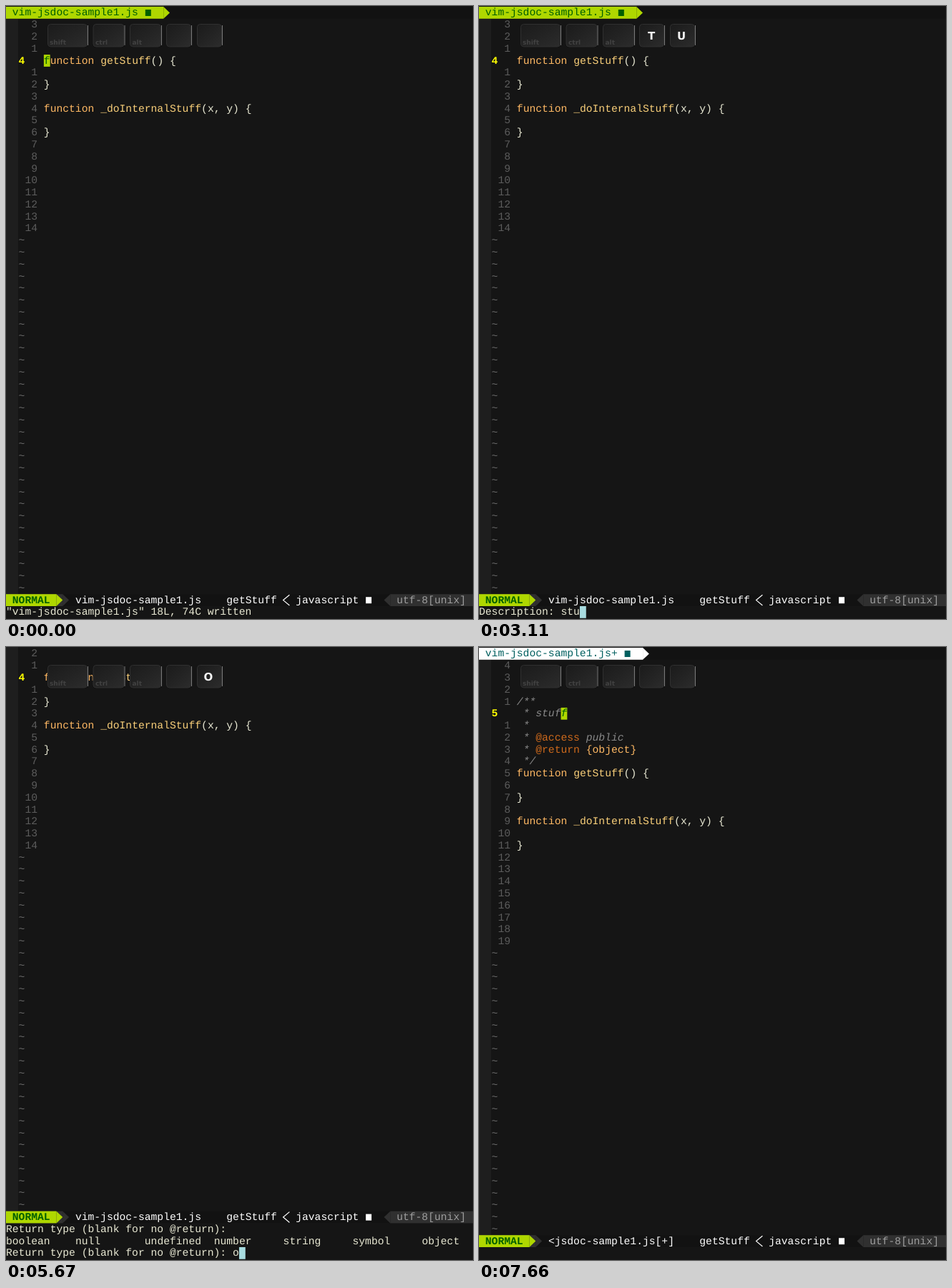
Animation of 653 by 858 pixels, one loop 8000 ms. Source, as an HTML page:

```html
<!DOCTYPE html>
<html lang="en">
<head>
<meta charset="utf-8">
<title>Editor session</title>
<style>
  html, body { margin: 0; width: 100%; height: 100%; overflow: hidden; background: #151515; }
  svg { display: block; }
  text { white-space: pre; text-rendering: geometricPrecision; }
  .mono { font-family: "Liberation Mono", monospace; font-size: 14.68px; }
  .key { font-family: "DejaVu Sans", sans-serif; font-weight: bold; }
</style>
</head>
<body>
<svg id="stage" width="653" height="858" viewBox="0 0 653 858">
  <defs>
    <linearGradient id="cap" x1="0" y1="0" x2="1" y2="1">
      <stop offset="0" stop-color="#1b1b1b"/>
      <stop offset=".5" stop-color="#232323"/>
      <stop offset="1" stop-color="#2c2c2c"/>
    </linearGradient>
  </defs>
  <g id="screen"></g>
  <g id="keys"></g>
</svg>
<script>
const LOOP = 8000, COL = 8.809, ROW = 16.78, TOP = 1;
const C = {
  bg: '#151515', bar: '#121212', sign: '#1e1e1e', green: '#afd700', darkGreen: '#005f00',
  gray: '#303030', number: '#5c5c5c', tilde: '#6c6c6c', keyword: '#ffb964', name: '#fad07a',
  text: '#e8e8d3', white: '#ffffff', comment: '#888888', tag: '#cf6a1c', prompt: '#a8dce0'
};
const FILE = 'vim-jsdoc-sample1.js';
const ASK = 'Return type (blank for no @return): ';
const TYPES = [[0, 'boolean'], [11, 'null'], [22, 'undefined'], [33, 'number'],
               [44, 'string'], [55, 'symbol'], [66, 'object']];

// Each entry changes part of the state from its time on.
const timeline = [
  [0, { line: `"${FILE}" 18L, 74C written`, prompt: false, ctrl: false, left: '', right: '', menu: false, done: false }],
  [1330, { ctrl: true }],
  [1530, { line: 'Description: ', prompt: true, right: 'L' }],
  [2080, { ctrl: false, right: '' }],
  [2770, { line: 'Description: s', right: 'S' }],
  [2960, { line: 'Description: st', left: 'S', right: 'T' }],
  [3110, { line: 'Description: stu', left: 'T', right: 'U' }],
  [3260, { line: 'Description: stuf', left: 'U', right: 'F' }],
  [3410, { line: 'Description: stuff', left: 'F' }],
  [3500, { line: ASK, right: 'Enter' }],
  [4100, { right: '' }],
  [4450, { left: '' }],
  [4610, { menu: true, right: 'Tab' }],
  [5220, { right: '' }],
  [5670, { line: ASK + 'o', right: 'O' }],
  [5860, { left: 'O', right: 'Tab' }],
  [5910, { line: ASK + 'object' }],
  [6510, { right: '' }],
  [6700, { left: '' }],
  [7100, { right: 'Enter' }],
  [7150, { line: '', prompt: false, menu: false, done: true }],
  [7660, { right: '' }]
];

const x = col => col * COL;
const y = row => TOP + row * ROW;
const esc = s => s.replace(/&/g, '&amp;').replace(/</g, '&lt;');
const rect = (left, top, w, h, fill) =>
  `<rect x="${left}" y="${top}" width="${w}" height="${h}" fill="${fill}"/>`;
const cells = (col, row, n, fill) => rect(x(col), y(row), x(n), ROW, fill);
const type = (col, row, str, fill, attrs = '') =>
  `<text class="mono" x="${x(col)}" y="${y(row) + 12.4}" fill="${fill}" ${attrs}>${esc(str)}</text>`;
const italic = 'font-style="italic"', bold = 'font-weight="bold"';
const arrow = (col, row, fill, dir = 1) => {
  const base = x(dir > 0 ? col : col + 1);
  return `<path d="M${base} ${y(row)}l${dir * COL} ${ROW / 2}l${-dir * COL} ${ROW / 2}z" fill="${fill}"/>`;
};
const icon = (col, row, fill) => rect(x(col) + 1, y(row) + 4, 8, 9, fill);

function tabLine(done) {
  const shift = done ? 1 : 0, fill = done ? '#ffffff' : C.green, ink = done ? '#005f5f' : C.darkGreen;
  return rect(0, 0, 653, y(1), C.bar) + cells(0, 0, 25 + shift, fill) + arrow(25 + shift, 0, fill) +
    type(1, 0, FILE + (done ? '+' : ''), ink) + icon(22 + shift, 0, ink);
}

function declaration(row, name, args) {
  return type(6, row, 'function', C.keyword) + type(15, row, name, C.name) +
    type(15 + name.length, row, `(${args}) {`, C.text) + type(6, row + 2, '}', C.text);
}

function docBlock() {
  return ['/**', ' * stuff', ' *', ' *         public', ' *', ' */']
    .map((s, i) => type(6, 4 + i, s, C.comment, italic)).join('') +
    type(9, 7, '@access', C.tag) + type(9, 8, '@return', C.tag) +
    type(17, 8, '{object}', C.keyword) +
    cells(13, 5, 1, C.green) + type(13, 5, 'f', C.darkGreen, italic);
}

function buffer(s) {
  const current = s.done ? 5 : 4, last = s.done ? 24 : 18, code = s.done ? 10 : 4;
  let out = '';
  for (let row = 1; row < 49; row++) {
    const n = String(Math.abs(row - current));
    if (row > last) out += type(2, row, '~', C.tilde);
    else if (row === current) out += type(2, row, String(current), '#ffff00', bold);
    else out += type(5 - n.length, row, n, C.number);
  }
  out += declaration(code, 'getStuff', '') + declaration(code + 4, '_doInternalStuff', 'x, y');
  if (s.done) out += docBlock();
  else if (!s.prompt) out += cells(6, 4, 1, C.green) + type(6, 4, 'f', C.darkGreen);
  return out;
}

function statusLine(row, done) {
  return rect(0, y(row), 653, ROW, C.bar) +
    cells(0, row, 9, C.gray) + arrow(9, row, C.gray) +
    cells(0, row, 8, C.green) + arrow(8, row, C.green) +
    type(1, row, 'NORMAL', C.darkGreen, bold) +
    type(11, row, done ? '<jsdoc-sample1.js[+]' : FILE, C.white) +
    type(35, row, 'getStuff', C.white) +
    `<path d="M${x(45)} ${y(row) + 1}l${-COL} ${ROW / 2 - 1}l${COL} ${ROW / 2 - 1}" fill="none" stroke="${C.white}" stroke-width="1.2"/>` +
    type(46, row, 'javascript', C.white) + icon(57, row, C.white) +
    arrow(60, row, C.gray, -1) + rect(x(61), y(row), 653 - x(61), ROW, C.gray) +
    type(62, row, 'utf-8[unix]', '#9e9e9e');
}

function screen(s) {
  const shift = s.menu ? 2 : 0;
  let out = rect(0, 0, 653, 858, C.bg) + rect(0, 0, 17, y(49 - shift), C.sign) +
    `<g transform="translate(0 ${-shift * ROW})">${tabLine(s.done)}${buffer(s)}</g>` +
    statusLine(49 - shift, s.done);
  if (s.menu) {
    out += type(0, 48, ASK, C.text) + TYPES.map(([col, word]) => type(col, 49, word, C.text)).join('');
  }
  out += type(0, 50, s.line, C.text);
  if (s.prompt) out += cells(s.line.length, 50, 1, C.prompt);
  return out;
}

const label = (left, base, size, str, fill, anchor = 'start') =>
  `<text class="key" x="${left}" y="${base}" font-size="${size}" fill="${fill}" text-anchor="${anchor}">${str}</text>`;

function cap(left, w) {
  return `<rect x="${left}" y="25" width="${w}" height="33" rx="4" fill="#111"/>` +
    `<rect x="${left + .5}" y="25.5" width="${w - 2}" height="31.5" rx="4" fill="url(#cap)" stroke="#303030"/>` +
    `<path d="M${left + w - .5} 27v28" stroke="#777"/>`;
}

const glyphs = {
  Tab: 'M271.5 45v5M272 47.5h11M275.5 45l-3 2.5 3 2.5M283.5 49v5M283 51.5h-11M279.5 49l3 2.5-3 2.5',
  Enter: 'M283 45v5h-11M275.5 47l-3.5 3 3.5 3'
};

function keys(s) {
  const glyph = glyphs[s.right], lit = '#f4f4f4', dim = '#424242';
  let out = cap(58, 57) + label(61, 53.7, 9, 'shift', dim) +
    cap(121.5, 45) + label(125, 53.7, 9, 'ctrl', s.ctrl ? lit : dim) +
    cap(173, 45) + label(176.5, 53.7, 9, 'alt', dim) +
    cap(224, 36) + label(241, 47, 15, s.left, lit, 'middle') +
    cap(267, glyph ? 57 : 36);
  out += glyph
    ? label(272, 36.5, 9.7, s.right, lit) + `<path d="${glyph}" fill="none" stroke="${lit}" stroke-width="1.2"/>`
    : label(283, 47, 15, s.right, lit, 'middle');
  return out;
}

const screenNode = document.getElementById('screen'), keysNode = document.getElementById('keys');
const start = performance.now();
let shown = -1;

function render(now) {
  const t = Math.max(0, now - start) % LOOP;
  const past = timeline.filter(([at]) => at <= t);
  if (past.length !== shown) {
    shown = past.length;
    const state = Object.assign({}, ...past.map(([, change]) => change));
    screenNode.innerHTML = screen(state);
    keysNode.innerHTML = keys(state);
  }
  requestAnimationFrame(render);
}
render(start);
</script>
</body>
</html>
```
